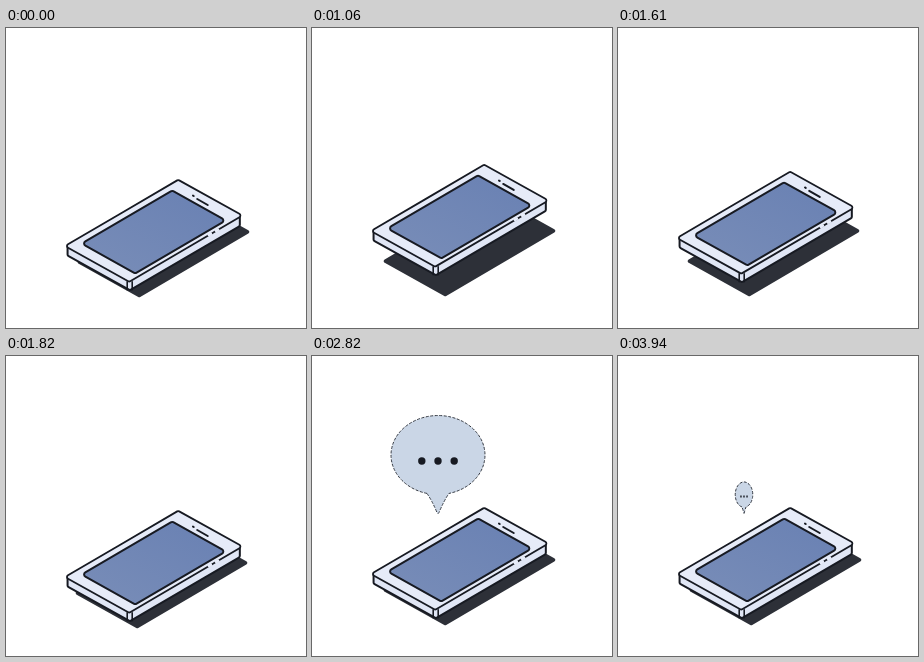
An HTML page with a canvas for the animation above (3970 ms loop, 300 px wide and 300 px high).

```html
<!DOCTYPE html>
<html lang="en">
<head>
<meta charset="utf-8">
<title>Phone message</title>
<style>
  html, body { margin: 0; width: 100%; height: 100%; overflow: hidden; background: #fff; }
  canvas { display: block; width: 300px; height: 300px; }
</style>
</head>
<body>
<canvas id="stage" width="300" height="300"></canvas>
<script>
const ctx = document.getElementById('stage').getContext('2d');
const LOOP = 3970;
const POP = 1920;
const EXIT = 3380;
const INK = '#171a22';
const BODY = '#e6ebf8';
const { PI, sin, cos, exp, min, max } = Math;

// Half lengths of the phone's two isometric directions
const LONG = { x: 55.5, y: -32.5 };
const SHORT = { x: 31.5, y: 17.5 };

const progress = (t, from, to) => max(0, min(1, (t - from) / (to - from)));
const smooth = u => u * u * (3 - 2 * u);

// Corners in the order top, right, bottom, left
function isoRect(cx, cy, long, short) {
  return [[1, -1], [1, 1], [-1, 1], [-1, -1]].map(([a, b]) => [
    cx + a * long * LONG.x + b * short * SHORT.x,
    cy + a * long * LONG.y + b * short * SHORT.y
  ]);
}

function shape(points, radius, fill, width) {
  const first = points[0], last = points[points.length - 1];
  ctx.beginPath();
  ctx.moveTo((first[0] + last[0]) / 2, (first[1] + last[1]) / 2);
  points.forEach((p, i) => {
    const next = points[(i + 1) % points.length];
    ctx.arcTo(...p, ...next, radius);
  });
  ctx.closePath();
  ctx.fillStyle = fill;
  ctx.fill();
  if (width) {
    ctx.strokeStyle = INK;
    ctx.lineWidth = width;
    ctx.stroke();
  }
}

function line(x0, y0, x1, y1, width = 2, color = INK) {
  ctx.beginPath();
  ctx.moveTo(x0, y0);
  ctx.lineTo(x1, y1);
  ctx.lineWidth = width;
  ctx.strokeStyle = color;
  ctx.stroke();
}

// An arc upwards, then a short dip on landing
function hop(t, start, length, height) {
  const u = progress(t, start, start + length);
  return u < 0.8 ? -height * sin(PI * u / 0.8) : 3 * sin(PI * (u - 0.8) / 0.2);
}

function drawShadow(t, phoneY) {
  const shift = -2 * (smooth(progress(t, 1100, 1290)) - smooth(progress(t, 1830, 1940)));
  shape(isoRect(157.5 + shift, 219 + max(-1, phoneY), 1.01, 1.01), 2, '#2d3038');
}

function drawPhone(dy) {
  ctx.save();
  ctx.translate(147.7, 202.8 + dy);
  const height = 10;
  const [top, right, bottom, left] = isoRect(0, 0, 0.99, 0.99);
  const lower = ([x, y]) => [x, y + height];
  shape([top, right, lower(right), lower(bottom), lower(left), left], 2, '#e0e6f5', 2);
  shape(isoRect(0, 0, 1.02, 1.02), 2, BODY, 1.8);

  // Light gaps in the front edge
  for (const u of [0.72, 0.785]) {
    const along = k => [0, 1].map(i => bottom[i] + (right[i] - bottom[i]) * k);
    const [x, y] = along(u), [x1, y1] = along(u + 0.015);
    line(x, y + 0.9, x1, y1 + 0.9, 3, BODY);
  }
  for (const x of [-26.5, -21.5]) line(x, 51, x, 59, 1.6);

  const glass = ctx.createLinearGradient(17, -37, -23, 41);
  glass.addColorStop(0, '#6c83b4');
  glass.addColorStop(1, '#768bb7');
  shape(isoRect(0, 1.2, 0.815, 0.855), 2.5, glass, 2);

  line(43.5, -31.8, 54, -25.8);
  line(39.3, -35.2, 40, -34.8);
  ctx.restore();
}

function drawSparkle(x, y, age) {
  if (age <= 0 || age >= 1) return;
  const inner = 1 + 7 * age;
  const outer = min(8.5, inner + 4 * sin(PI * age));
  for (let i = 0; i < 4; i++) {
    const angle = PI / 4 + i * PI / 2;
    const c = cos(angle), s = sin(angle);
    const ray = [x + inner * c, y + inner * s, x + outer * c, y + outer * s];
    line(...ray, 3, '#555963');
    line(...ray, 1.6, '#fff');
  }
}

// Springs open, then stretches wide and tall before it shrinks away
function bubbleScale(t) {
  const s = t - POP;
  const spring = decay => 1 - exp(-s / decay) * cos(2 * PI * s / 280);
  const u = progress(t, EXIT, LOOP);
  const wide = 1 - u ** 4 + 0.5 * sin(PI * u) * (1 - u);
  const tall = 1 - u ** 7 + 0.16 * sin(PI * u) * u;
  return [spring(150) * wide, spring(120) * tall];
}

function drawBubble(t) {
  if (t <= POP) return;
  const s = t - 2270;
  const float = 3.7 * exp(-s / 900) * cos(2 * PI * s / 733);
  ctx.save();
  ctx.translate(126, 157.5 + float);
  ctx.scale(...bubbleScale(t));
  ctx.beginPath();
  ctx.ellipse(0, -58.5, 47, 39.5, 0, PI * 0.575, PI * 2.425);
  ctx.quadraticCurveTo(6, -13, 1, -1);
  ctx.quadraticCurveTo(0, 1, -1, -1);
  ctx.quadraticCurveTo(-6, -13, -11, -20);
  ctx.closePath();
  ctx.fillStyle = '#cad6e6';
  ctx.fill();

  // The outline keeps its weight at every scale
  ctx.save();
  ctx.resetTransform();
  ctx.setLineDash([3, 1.5]);
  ctx.lineCap = 'butt';
  ctx.strokeStyle = '#353a43';
  ctx.lineWidth = 1;
  ctx.stroke();
  ctx.restore();

  ctx.fillStyle = INK;
  for (let i = 0; i < 3; i++) {
    const start = 2180 + i * 170;
    ctx.beginPath();
    ctx.arc((i - 1) * 16.2, -52.5, 3.7 * smooth(progress(t, start, start + 80)), 0, PI * 2);
    ctx.fill();
  }
  ctx.restore();
}

function draw(t) {
  ctx.fillStyle = '#fff';
  ctx.fillRect(0, 0, 300, 300);
  ctx.lineCap = ctx.lineJoin = 'round';
  const phoneY = hop(t, 812, 455, 18) + hop(t, 1270, 610, 10);
  drawShadow(t, phoneY);
  drawPhone(phoneY);
  drawBubble(t);
  drawSparkle(194.5, 66, (t - 2050) / 330);
  drawSparkle(61, 92, (t - 2440) / 330);
}

const start = performance.now();
function tick() {
  draw((performance.now() - start) % LOOP);
  requestAnimationFrame(tick);
}
tick();
</script>
</body>
</html>
```
